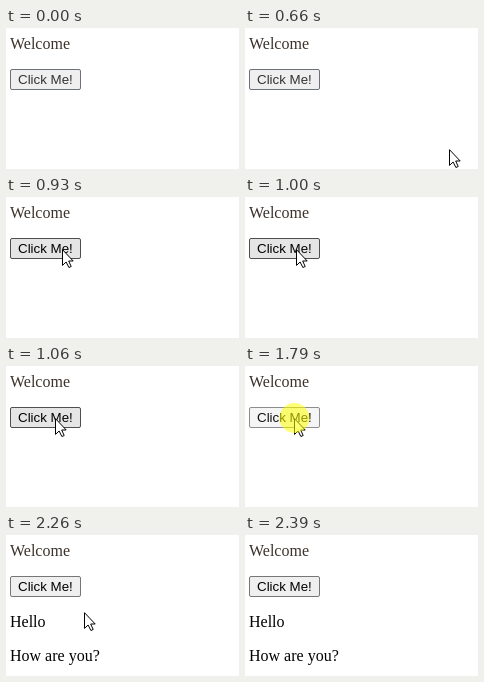
Write an HTML page that moves like this. It is 233 px wide and 141 px high and loops after 3550 ms.

```html
<!DOCTYPE html>
<html lang="en">
<head>
<meta charset="utf-8">
<title>Click Me</title>
<style>
  html, body { margin: 0; width: 100%; height: 100%; overflow: hidden; background: #fff; }
  svg { display: block; width: 100vw; height: 100vh; }
  text { font: 16px "Liberation Serif", "Times New Roman", serif; }
  #label { font: 13.333px "Liberation Sans", Arial, sans-serif; }
</style>
</head>
<body>
<svg viewBox="0 0 233 141">
  <rect width="233" height="141" fill="#fff"/>
  <text x="4" y="21" fill="#3c322b">Welcome</text>
  <rect id="button" x="4.5" y="41.5" width="70" height="20" rx="1.5"/>
  <text id="label" x="12" y="56">Click Me!</text>
  <g id="reply">
    <text x="4" y="92">Hello</text>
    <text x="4" y="126">How are you?</text>
  </g>
  <path id="cursor" d="M.5 .7V16.4L4.1 13L6.9 18.5L9.2 17.5L6.7 12H11.2Z"
        fill="#fff" stroke="#000" stroke-linejoin="round"/>
  <circle id="halo" cx="49.5" cy="52" r="15" fill="#ff0" fill-opacity=".55"/>
</svg>
<script>
  const LOOP = 3550, PRESS = 1790, RELEASE = 1860;
  const $ = id => document.getElementById(id);
  const [button, label, reply, halo, cursor] =
    ["button", "label", "reply", "halo", "cursor"].map($);

  // Pointer stops: start time, x, y; no position means off stage.
  const stops = [
    [0], [660, 204, 121], [720, 166, 88], [790, 132, 57], [860, 90, 50],
    [930, 56, 52], [1000, 51, 52], [1060, 49, 52],
    [2260, 78, 77], [2330, 146, 128], [2390]
  ];

  const looks = {
    idle: ["#efefef", "#6c717c", "#333"],
    hover: ["#e5e5e5", "#4f4f4f", "#000"],
    active: ["#f5f5f5", "#8d8d8d", "#111"],
    left: ["#efefef", "#767676", "#000"]
  };

  const show = (el, on) => el.setAttribute("visibility", on ? "visible" : "hidden");

  function buttonState(t, x, y) {
    if (t >= PRESS && t < RELEASE) return "active";
    if (x >= 4 && x < 75 && y >= 41 && y < 62) return "hover";
    return t < RELEASE ? "idle" : "left";
  }

  function draw(t) {
    const [, x, y] = stops.filter(s => s[0] <= t).pop();
    const [fill, border, ink] = looks[buttonState(t, x, y)];
    button.setAttribute("fill", fill);
    button.setAttribute("stroke", border);
    label.setAttribute("fill", ink);
    show(halo, t >= PRESS && t < RELEASE);
    show(reply, t >= RELEASE);
    show(cursor, x !== undefined);
    if (x !== undefined) cursor.setAttribute("transform", `translate(${x} ${y})`);
  }

  const start = performance.now();
  function tick() {
    draw((performance.now() - start) % LOOP);
    requestAnimationFrame(tick);
  }
  tick();
</script>
</body>
</html>
```
